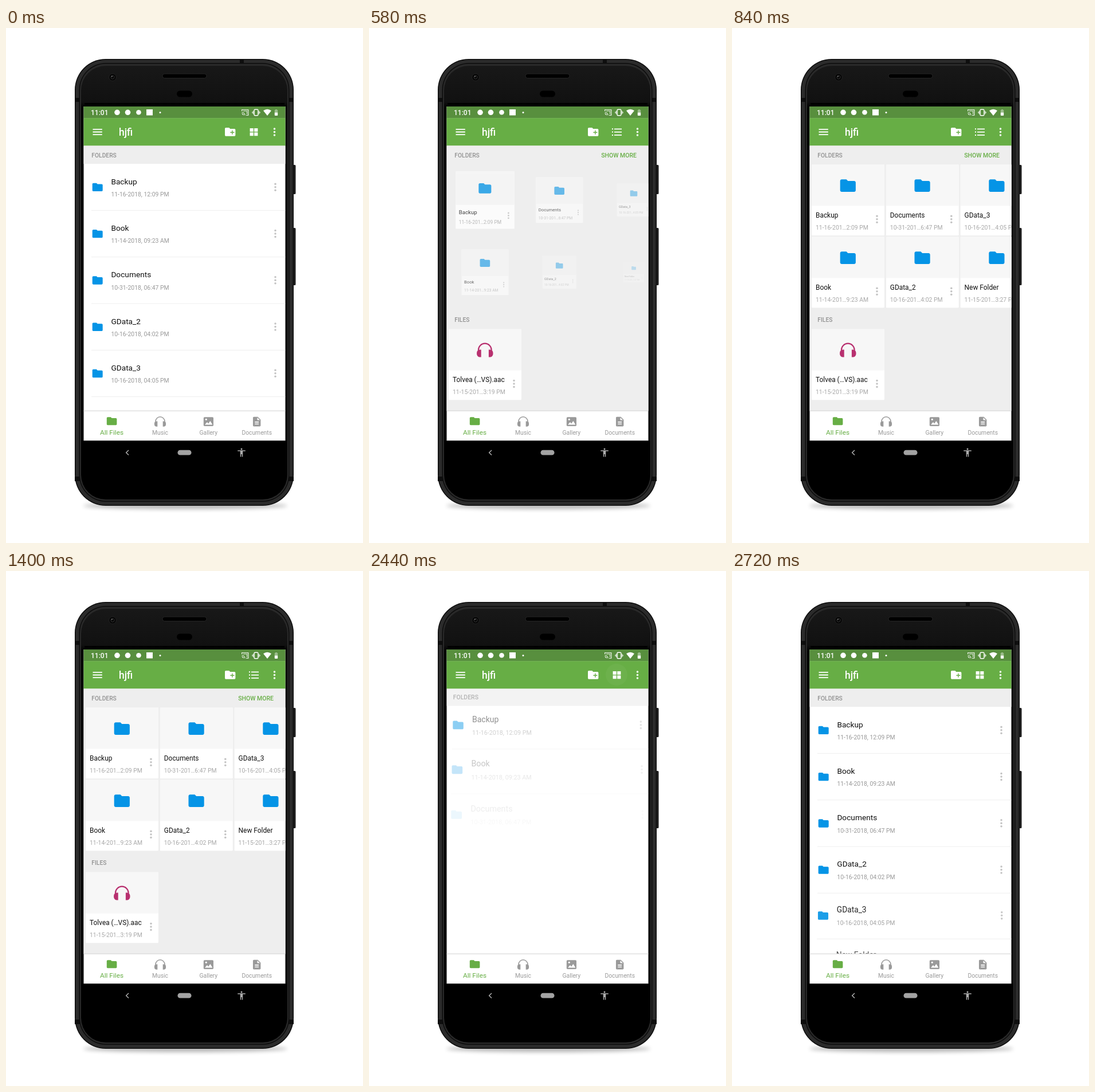
These frames come from a looping animation (623 px wide and 899 px high, 2740 ms). An HTML page:

```html
<!DOCTYPE html>
<html lang="en">
<head>
<meta charset="utf-8">
<title>File manager: list and grid</title>
<style>
html, body { margin: 0; width: 100%; height: 100%; overflow: hidden; background: #fff; }
svg { display: block; width: 100vw; height: 100vh; font-family: Roboto, sans-serif; }
</style>
</head>
<body>
<svg id="stage" viewBox="0 0 623 899">
  <defs>
    <linearGradient id="face" x1="0" y1="66" x2="0" y2="140" gradientUnits="userSpaceOnUse">
      <stop offset="0" stop-color="#181818"/><stop offset=".85" stop-color="#111"/><stop offset="1" stop-color="#000"/>
    </linearGradient>
    <filter id="soft" x="-10%" y="-150%" width="120%" height="400%"><feGaussianBlur stdDeviation="3.5"/></filter>
    <clipPath id="content"><rect x="135.5" y="205.5" width="352" height="462.5"/></clipPath>
    <path id="folder" d="M-2-8H-8c-1.1 0-2 .9-2 2V6c0 1.1.9 2 2 2H8c1.1 0 2-.9 2-2V-4c0-1.1-.9-2-2-2H0z"/>
    <g id="headphones">
      <path d="M-11.3 3V-.2A11.3 11.3 0 0 1 11.3-.2V3" fill="none" stroke="currentColor" stroke-width="2.2"/>
      <path d="M-6.6-.8V12.4H-8.6a5.6 5.6 0 0 1-5.6-5.6V4.8A5.6 5.6 0 0 1-8.6-.8zM6.6-.8V12.4H8.6a5.6 5.6 0 0 0 5.6-5.6V4.8A5.6 5.6 0 0 0 8.6-.8z" fill="currentColor"/>
    </g>
    <g id="dots"><circle cy="-5.5" r="1.75"/><circle r="1.75"/><circle cy="5.5" r="1.75"/></g>
  </defs>

  <ellipse cx="313" cy="834" rx="178" ry="6" fill="#000" opacity=".28" filter="url(#soft)"/>
  <g id="phone">
    <path d="M501 239h3a1.5 1.5 0 0 1 1.5 1.5v48a1.5 1.5 0 0 1-1.5 1.5h-3zM501 349h3a1.5 1.5 0 0 1 1.5 1.5v97a1.5 1.5 0 0 1-1.5 1.5h-3z" fill="#1c1c1c"/>
    <rect x="120" y="54" width="382" height="780" rx="54" fill="#0d0d0d"/>
    <rect x="121.5" y="55.5" width="379" height="777" rx="52.5" fill="#2b2b2b"/>
    <path d="M120 122h9v7h-9zM493 122h9v7h-9zM120 783h9v8h-9zM493 783h9v8h-9zM408 54h7v7h-7z" fill="#0e0e0e"/>
    <rect x="127.5" y="61" width="367" height="766" rx="47" fill="#0c0c0c"/>
    <rect x="129" y="62.5" width="364" height="763" rx="45.5" fill="#292929"/>
    <rect x="131" y="66" width="360" height="757" rx="43" fill="url(#face)"/>
    <path d="M137 132.5H486" stroke="#000" stroke-width="3"/>
    <rect x="273" y="80" width="77" height="7.5" rx="3.7" fill="#000" stroke="#252525"/>
    <rect x="298" y="109.5" width="27" height="11" rx="5.5" fill="#000"/>
    <circle cx="186" cy="86" r="6.3" fill="#050505" stroke="#242424"/>
    <circle cx="186" cy="86" r="3" fill="none" stroke="#333"/><circle cx="185" cy="84.5" r="1" fill="#777"/>
  </g>

  <rect x="135.5" y="137" width="352" height="583.5" fill="#fff"/>
  <rect x="135.5" y="137" width="352" height="20.5" fill="#588f3e"/>
  <rect x="135.5" y="157.2" width="352" height="48.3" fill="#67ae45"/>
  <circle id="ripple" cx="432" cy="181" r="0" fill="#fff"/>

  <g fill="#fff">
    <text x="148" y="152" font-size="12" font-weight="500">11:01</text>
    <circle cx="194" cy="147.3" r="4.8"/><circle cx="212.5" cy="147.3" r="4.8"/><circle cx="231.5" cy="147.3" r="4.3"/>
    <rect x="245" y="142" width="11" height="10.5"/><circle cx="269" cy="147.5" r="1.5"/>
    <path d="M449 144.3Q456 139.2 463 144.3L456 153z"/>
    <path d="M468.8 147.5h5.4v4.5a1 1 0 0 1-1 1h-3.4a1 1 0 0 1-1-1z"/>
    <path d="M470.2 142h2.6v1h1.4v4.5h-5.4V143h1.4z" opacity=".4"/>
    <rect x="433.2" y="142.2" width="6.6" height="10.6" rx="1" fill="none" stroke="#fff" stroke-width="1.4"/>
    <path d="M431.6 144.5v6M441.4 144.5v6M430 146v3M443 146v3" stroke="#fff" stroke-width="1"/>
    <g fill="none" stroke="#fff" stroke-width="1.1">
      <path d="M411.6 145v-2.2h11.2v9.4h-4M411.5 147a5.5 5.5 0 0 1 5.3 5.3M411.5 149.5a3 3 0 0 1 2.8 2.8"/>
      <path d="M414 145h6.5v5" opacity=".8"/>
    </g>
    <path d="M151.5 176h16.3v1.8h-16.3zM151.5 180.6h16.3v1.8h-16.3zM151.5 185.2h16.3v1.8h-16.3z"/>
    <text x="197" y="187.8" font-size="17.5" font-weight="500">hjfi</text>
    <use href="#folder" transform="translate(391.2 181.4) scale(.917)"/>
    <path d="M394.9 178.7v7M391.4 182.2h7" stroke="#67ae45" stroke-width="1.4"/>
    <use href="#dots" x="468.5" y="181.5"/>
    <path id="gridIcon" d="M425.6 175h6.2v6h-6.2zM433.2 175h6.2v6h-6.2zM425.6 182.3h6.2v6h-6.2zM433.2 182.3h6.2v6h-6.2z"/>
    <path id="listIcon" d="M424 175.3h2v2h-2zM424 180.6h2v2h-2zM424 185.9h2v2h-2zM428 175.4h13v1.8h-13zM428 180.7h13v1.8h-13zM428 186h13v1.8h-13z"/>
  </g>

  <g clip-path="url(#content)">
    <g id="list"></g>
    <g id="grid"><rect x="135" y="205" width="353" height="464" fill="#eee"/></g>
  </g>

  <path d="M135.5 668.3H487.5" stroke="#d2d2d2"/>
  <g fill="#9a9a9a" font-size="10.3" text-anchor="middle">
    <use href="#folder" transform="translate(184.6 686.2) scale(.88)" fill="#67ae45"/>
    <text x="184.5" y="710.3" font-size="11.8" fill="#67ae45">All Files</text>
    <use href="#headphones" transform="translate(269 687) scale(.71)" color="#9a9a9a"/>
    <text x="269" y="710">Music</text>
    <rect x="344.8" y="679.2" width="17.2" height="15.8" rx="1.8"/>
    <path d="M347 692.5l4-4.5 2.2 2.4 3.2-4.4 4 6.5z" fill="#fff"/><circle cx="349.3" cy="683.3" r="1.6" fill="#fff"/>
    <text x="353.3" y="710">Gallery</text>
    <path transform="translate(427.6 677) scale(.84)" fill-rule="evenodd" d="M14 2H6c-1.1 0-2 .9-2 2v16c0 1.1.9 2 2 2h12c1.1 0 2-.9 2-2V8zm2 16H8v-2h8zm0-4H8v-2h8zm-3-5V3.5L18.5 9z"/>
    <text x="437.7" y="710">Documents</text>
  </g>

  <rect x="135.5" y="720.5" width="352" height="41" fill="#000"/>
  <path d="M214 737l-4.3 4.2 4.3 4.2" fill="none" stroke="#b4b4b4" stroke-width="1.4"/>
  <rect x="299.5" y="736.8" width="24" height="8.8" rx="4.4" fill="#a3a3a3"/>
  <path transform="translate(402 732) scale(.75)" fill="#acacac" d="M12 2a2 2 0 0 1 0 4 2 2 0 0 1 0-4zm9 7h-6v13h-2v-6h-2v6H9V9H3V7h18z"/>
</svg>

<script>
const LOOP = 2740, STEP = 20;
const TO_GRID = 270, TO_LIST = 2254;
const TAPS = [20, 1980];
const GREEN = '#67ae45', BLUE = '#0594e6', GREY = '#929292';
const MID_X = 311.5, ROW_H = 81.3, LIST_TOP = 237;

const $ = id => document.getElementById(id);
const list = $('list'), grid = $('grid'), ripple = $('ripple');

function group(parent, markup = '') {
  const g = document.createElementNS('http://www.w3.org/2000/svg', 'g');
  g.innerHTML = markup;
  return parent.appendChild(g);
}
const text = (x, y, size, fill, str, weight = 400) =>
  `<text x="${x}" y="${y}" font-size="${size}" fill="${fill}" font-weight="${weight}">${str}</text>`;
const use = (id, x, y, scale, fill) =>
  `<use href="#${id}" transform="translate(${x} ${y}) scale(${scale})" fill="${fill}" color="${fill}"/>`;
const heading = (y, str) => text(149.3, y, 10.3, GREY, str, 500);

const folders = [
  ['Backup', '11-16-2018, 12:09 PM'],
  ['Book', '11-14-2018, 09:23 AM'],
  ['Documents', '10-31-2018, 06:47 PM'],
  ['GData_2', '10-16-2018, 04:02 PM'],
  ['GData_3', '10-16-2018, 04:05 PM'],
  ['New Folder', '11-15-2018, 03:27 PM']
];
const shorten = date => date.slice(0, 9) + '…' + date.slice(-7);

// List: the section heading followed by one row per folder.
const listItems = [{
  el: group(list, `<rect x="135" y="205.5" width="353" height="31.7" fill="#eee"/>` + heading(226, 'FOLDERS')),
  height: 31.7, cy: 221.3
}];
folders.forEach(([name, date], i) => {
  const cy = LIST_TOP + (i + .5) * ROW_H;
  listItems.push({
    el: group(list,
      use('folder', 159.7, cy + .2, .9, BLUE) +
      text(183.4, cy - 5, 13.7, '#111', name) +
      text(183.4, cy + 16.5, 10.4, '#999', date) +
      use('dots', 470, cy, 1, '#c3c3c3') +
      `<path d="M149 ${cy + 40.8}H487.5" stroke="#eee"/>`),
    height: ROW_H, cy
  });
});

// Grid: cards are drawn around their own centre.
function card(parent, cx, cy, icon, color, name, date) {
  const el = group(parent,
    `<rect x="-63.4" y="-61.8" width="126.8" height="123.6" rx="1" fill="#fff"/>
     <rect x="-63.4" y="-61.8" width="126.8" height="72" rx="1" fill="#f7f7f7"/>` +
    use(icon, -.2, -25.3, icon === 'folder' ? 1.36 : 1, color) +
    text(-56.5, 30.4, 11.9, '#111', name) +
    text(-56.5, 51.8, 10.4, '#a8a8a8', date) +
    use('dots', 50.5, 33.4, 1, '#c3c3c3'));
  return { el, cx, cy };
}

const showMore = text(405.2, 226, 10.5, GREEN, 'SHOW MORE', 500);
const sections = [
  { el: group(grid, heading(226, 'FOLDERS') + showMore), cx: MID_X, cy: 221 },
  { el: group(grid), cx: MID_X, cy: 363 },
  { el: group(grid, heading(513, 'FILES')), cx: MID_X, cy: 509 }
];
const fileCard = card(grid, 202.5, 587.5, 'headphones', '#b8306f', 'Tolvea (…VS).aac', '11-15-201…3:19 PM');
const cards = folders.map(([name, date], i) => {
  const col = i >> 1, row = i % 2;
  const item = card(sections[1].el, 202.5 + col * 129.8, 300.4 + row * 126, 'folder', BLUE, name, shorten(date));
  return { ...item, order: col + row };
});

const clamp = x => Math.min(1, Math.max(0, x));
const ease = x => (1 - Math.cos(Math.PI * clamp(x))) / 2;

function place(el, transform, opacity) {
  el.setAttribute('transform', transform);
  el.setAttribute('opacity', opacity);
}

function drawRipple(t) {
  const age = t - (t >= TAPS[1] ? TAPS[1] : TAPS[0]);
  ripple.setAttribute('r', 6 + 13 * Math.sqrt(clamp(age / 225)));
  ripple.setAttribute('opacity', .15 * clamp((age + 20) / 80) * clamp((520 - age) / 240));
}

function drawList(t) {
  listItems.forEach(({ el, height, cy }, i) => {
    const p = t < TO_GRID ? 1 : ease((t - TO_LIST - i * 45) / 300);
    const scale = 1 + .05 * (1 - p);
    const y = cy - .2 * height * (1 - p);
    place(el, `translate(${MID_X} ${y}) scale(${scale}) translate(${-MID_X} ${-cy})`, p);
  });
}

function drawGrid(t) {
  const p = ease((t - TO_GRID) / 300);
  for (const { el, cx, cy } of sections)
    place(el, `translate(${cx} ${cy}) scale(${p}) translate(${-cx} ${-cy})`, p);
  place(fileCard.el, `translate(${fileCard.cx} ${fileCard.cy}) scale(${p})`, p);
  for (const { el, cx, cy, order } of cards) {
    const s = ease((t - 302 - order * 46) / 390);
    place(el, `translate(${cx} ${cy}) scale(${s})`, s ** 1.25);
  }
}

function draw(time) {
  const t = Math.floor((time % LOOP) / STEP) * STEP;
  const isGrid = t >= TO_GRID && t < TO_LIST;
  const show = (el, on) => el.setAttribute('visibility', on ? 'visible' : 'hidden');
  show(grid, isGrid);
  show($('listIcon'), isGrid);
  show(list, !isGrid);
  show($('gridIcon'), !isGrid);
  drawRipple(t);
  isGrid ? drawGrid(t) : drawList(t);
}

const start = performance.now();
function tick() {
  draw(performance.now() - start);
  requestAnimationFrame(tick);
}
tick();
</script>
</body>
</html>
```
